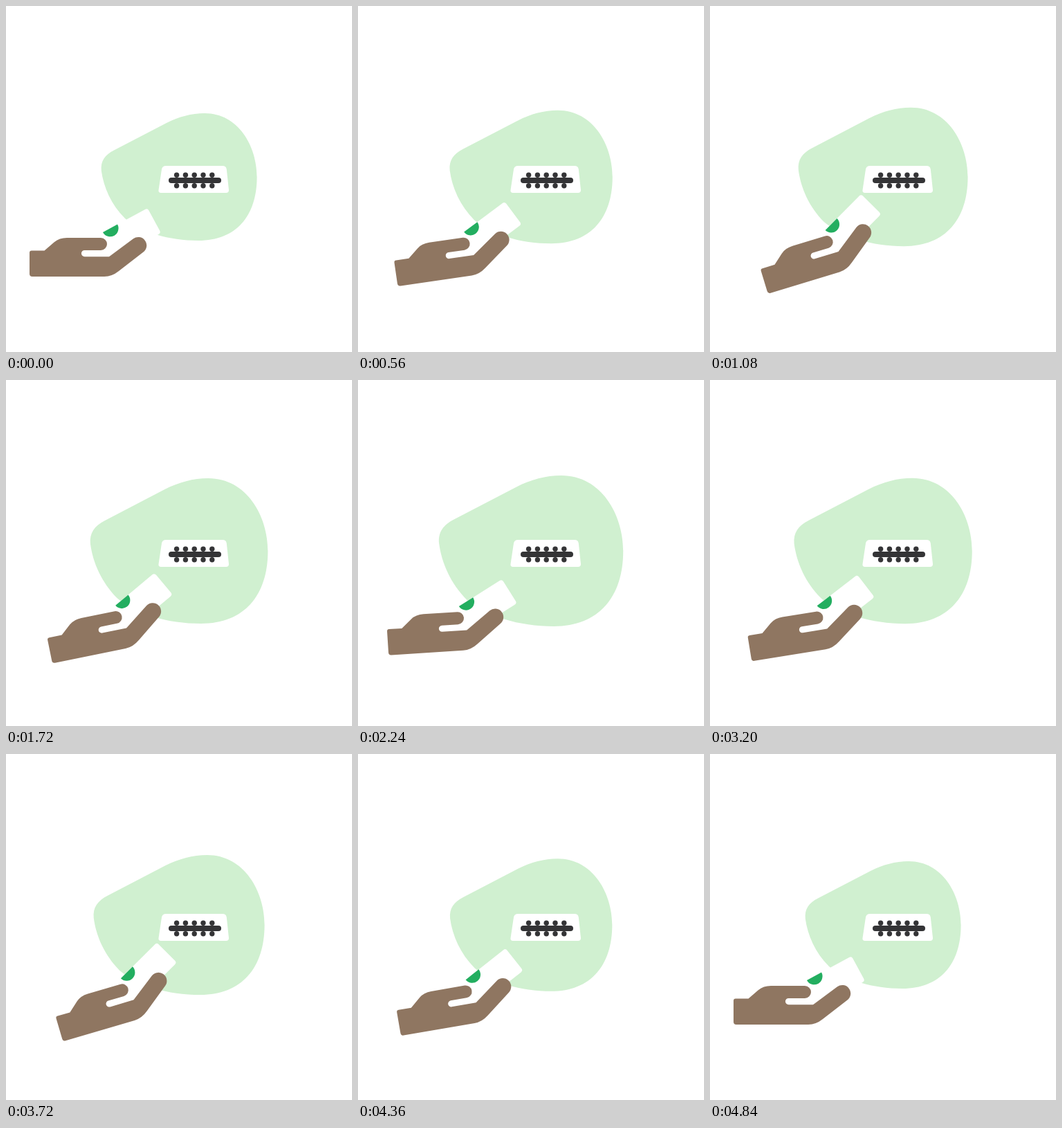
An HTML page for the animation above (4.88 s loop, 500x500 px).

```html
<!DOCTYPE html>
<html lang="en">
<head>
<meta charset="utf-8">
<title>Card and reader</title>
<style>
  html, body { margin: 0; width: 100%; height: 100%; overflow: hidden; background: #fff; }
  svg { display: block; width: 100%; height: 100%; }
</style>
</head>
<body>
<svg viewBox="0 0 500 500">
  <path id="blob" fill="#d0f0d0" d="M137.8 238 C136.5 224 143 215.3 156 208.6 L232 169
    C250 160 268 155 287 155 C336 155 362.6 203 362.6 247
    C362.6 303 333 339 278 339 C235 339 196 327 172 307 C152 287 141 262 137.8 238 Z"/>

  <path fill="#fff" d="M231 231 H313 Q318 231 318.8 236 L322 266 Q322 270 318 270
    H224 Q220 270 220.5 266 L225 236 Q226 231 231 231 Z"/>
  <g id="keys" fill="#343436">
    <rect x="235" y="248" width="76" height="8" rx="4"/>
  </g>

  <g id="hand">
    <g transform="translate(139.7 327.2) rotate(-28.5)">
      <rect x="-2" width="75.7" height="41" rx="4" fill="#fff"/>
      <path d="M0.3 0 A12 12 0 0 0 24.3 0 Z" fill="#23ae60"/>
    </g>
    <path fill="#8f7661" d="M37 353.5 H55.5 L70 341 Q77 335 88 335 H137
      A9 9 0 0 1 137 353 H113.5 A4.6 4.6 0 0 0 113.5 362.2 H149
      L184 336.2 A12 12 0 0 1 198.2 355.8 L163 383 Q153 391 142 391 H38
      Q34 391 34 387 V356.5 Q34 353.5 37 353.5 Z"/>
  </g>
</svg>
<script>
  const LOOP = 4880, STEP = 40;
  const blob = document.getElementById('blob');
  const hand = document.getElementById('hand');
  const keys = document.getElementById('keys');

  // [time, value] pairs joined by straight lines
  const SCALE = [[0, 1], [2500, 1.205], [4840, 1], [LOOP, 1]];
  const TILT = [[0, 0], [60, 0], [1210, 19], [2490, 0], [2530, 0], [3910, 19], [4840, 0], [LOOP, 0]];

  for (let i = 0; i < 5; i++) {
    for (const y of [244.2, 259.8]) {
      const dot = document.createElementNS('http://www.w3.org/2000/svg', 'circle');
      dot.setAttribute('cx', 246.6 + i * 12.8);
      dot.setAttribute('cy', y);
      dot.setAttribute('r', 3.7);
      keys.append(dot);
    }
  }

  function valueAt(track, t) {
    const i = track.findIndex(([time]) => time > t);
    const [t0, a] = track[i - 1], [t1, b] = track[i];
    return a + (b - a) * (t - t0) / (t1 - t0);
  }

  function draw(now) {
    const t = Math.floor((now % LOOP) / STEP) * STEP;
    const s = valueAt(SCALE, t);
    blob.setAttribute('transform', `translate(250.3 247) scale(${s}) translate(-250.3 -247)`);
    hand.setAttribute('transform', `rotate(${-valueAt(TILT, t)} 143 235.5)`);
  }

  function tick() {
    draw(performance.now());
    requestAnimationFrame(tick);
  }
  tick();
</script>
</body>
</html>
```
